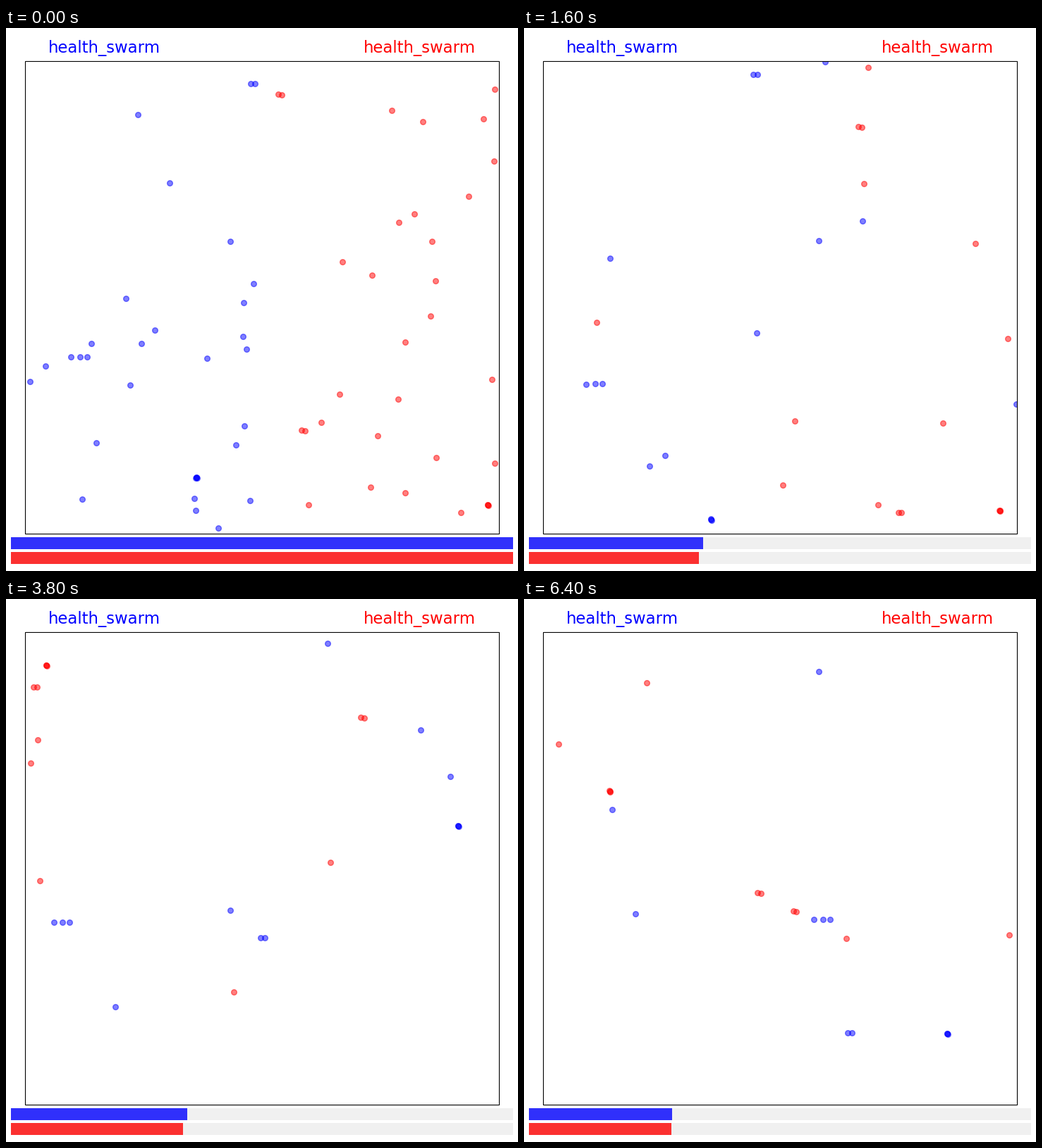
These frames come from a looping animation (726x771 px, 6.45 s). A matplotlib script:

```python
import matplotlib.pyplot as plt
import numpy as np
from matplotlib.animation import FuncAnimation
from matplotlib.patches import Rectangle

W, H, DPI = 726, 771, 100
FRAMES, INTERVAL = 129, 50
ORIGIN, SIDE = np.array([27.2, 46.8]), 671.4   # toroidal arena
STEP = SIDE / 100                              # top speed per axis and frame
TURNS = [0, 19, 45, 63, 90, 111, 128]          # frames where flocks change course
AGENTS = 32
BAR_X, BAR_W, BAR_H = 7, 712, 17

plt.rcParams["font.family"] = "DejaVu Sans"
fig = plt.figure(figsize=(W / DPI, H / DPI), dpi=DPI, facecolor="white")
ax = fig.add_axes([0, 0, 1, 1])
ax.set_xlim(0, W)
ax.set_ylim(H, 0)
ax.axis("off")

arena = Rectangle(ORIGIN, SIDE, SIDE, fill=False, ec="black", lw=0.8, zorder=5)
ax.add_patch(arena)
clock = np.arange(FRAMES)


def flock(path, offsets):
    """Tracks of agents that share one path, always taking the short way round."""
    path = np.array(path, float)
    hops = (np.diff(path, axis=0) + SIDE / 2) % SIDE - SIDE / 2
    path = path[0] + np.vstack([[0, 0], hops.cumsum(axis=0)])
    lead = np.stack([np.interp(clock, TURNS, axis) for axis in path.T], axis=1)
    return [lead + offset for offset in offsets]


def wanderer(rng, x_range):
    """Track of a lone agent that keeps a random course between turns."""
    start = ORIGIN + SIDE * np.array([rng.uniform(*x_range), rng.random()])
    course = rng.uniform(-1, 1, (len(TURNS), 2)) * STEP
    leg = np.searchsorted(TURNS, clock[1:])
    return start + np.vstack([[0, 0], course[leg].cumsum(axis=0)])


class Swarm:
    def __init__(self, color, text_x, bar_y, bar_ends, x_range, seed, flocks):
        rng = np.random.default_rng(seed)
        tracks = [t for path, offsets in flocks for t in flock(path, offsets)]
        loners = AGENTS - len(tracks)
        # Many wanderers fall early, few late.
        rank = (np.arange(loners) + 0.5) / loners
        self.life = np.r_[np.full(len(tracks), np.inf), 12 * (rank ** -1.25 - 1)]
        tracks += [wanderer(rng, x_range) for _ in range(loners)]
        self.tracks = ORIGIN + (np.array(tracks) - ORIGIN) % SIDE

        # Health drops fast in the first clash, then drifts.
        self.ends = np.interp(clock, TURNS, bar_ends)
        clash = clock[:TURNS[1]]
        fall = (1 - clash / TURNS[1]) ** 1.5
        self.ends[clash] = bar_ends[1] + (bar_ends[0] - bar_ends[1]) * fall

        ax.text(text_x, 35, "health_swarm", color=color, size=16.4, va="baseline")
        ax.add_patch(Rectangle((BAR_X, bar_y), BAR_W, BAR_H, fc="#f0f0f0", lw=0))
        self.bar = Rectangle((BAR_X, bar_y), BAR_W, BAR_H, fc=color, alpha=0.8, lw=0)
        ax.add_patch(self.bar)
        self.dots, = ax.plot([], [], "o", color=color, ms=5.5, alpha=0.5, zorder=3)
        self.dots.set_clip_path(arena)

    def draw(self, frame):
        alive = self.life >= frame
        self.dots.set_data(*self.tracks[alive, frame].T)
        self.bar.set_width(round(self.ends[frame]) - BAR_X)
        return self.dots, self.bar


TIGHT = [(0, 0), (0.5, 1), (-0.5, -0.5)]
ROW = [(0, 0), (12.5, -0.5), (22.5, -0.5)]

blue = Swarm(
    "blue", 60, 723, [719, 260, 247, 252, 263, 248, 210], (0, 0.49), 4, [
        ([(270, 638), (352, 610), (178, 114), (57, 235), (547, 416), (502, 557),
          (600, 617)], TIGHT),
        ([(92, 467), (54, 539), (122, 472), (135, 500), (667, 415), (526, 556),
          (411, 455)], ROW),
        ([(347, 79), (388, 140), (261, 663), (288, 542), (439, 415), (482, 555),
          (459, 616)], [(0, 0), (6, 0)])])
red = Swarm(
    "red", 507, 744, [719, 262, 235, 241, 262, 257, 209], (0.51, 1), 9, [
        ([(683, 677), (685, 667), (664, 703), (32, 680), (84, 187), (177, 231),
          (122, 273)], TIGHT),
        ([(419, 571), (443, 641), (618, 63), (625, 66), (131, 188), (272, 328),
          (382, 443)], [(0, 0), (4.5, 0.5)]),
        ([(386, 94), (408, 117), (540, 163), (519, 175), (486, 161), (345, 302),
          (331, 417)], [(0, 0), (4.5, 0.5)])])


def update(frame):
    return [*blue.draw(frame), *red.draw(frame)]


anim = FuncAnimation(fig, update, frames=FRAMES, interval=INTERVAL, repeat=True,
                     repeat_delay=0, blit=False)
plt.show()
```
